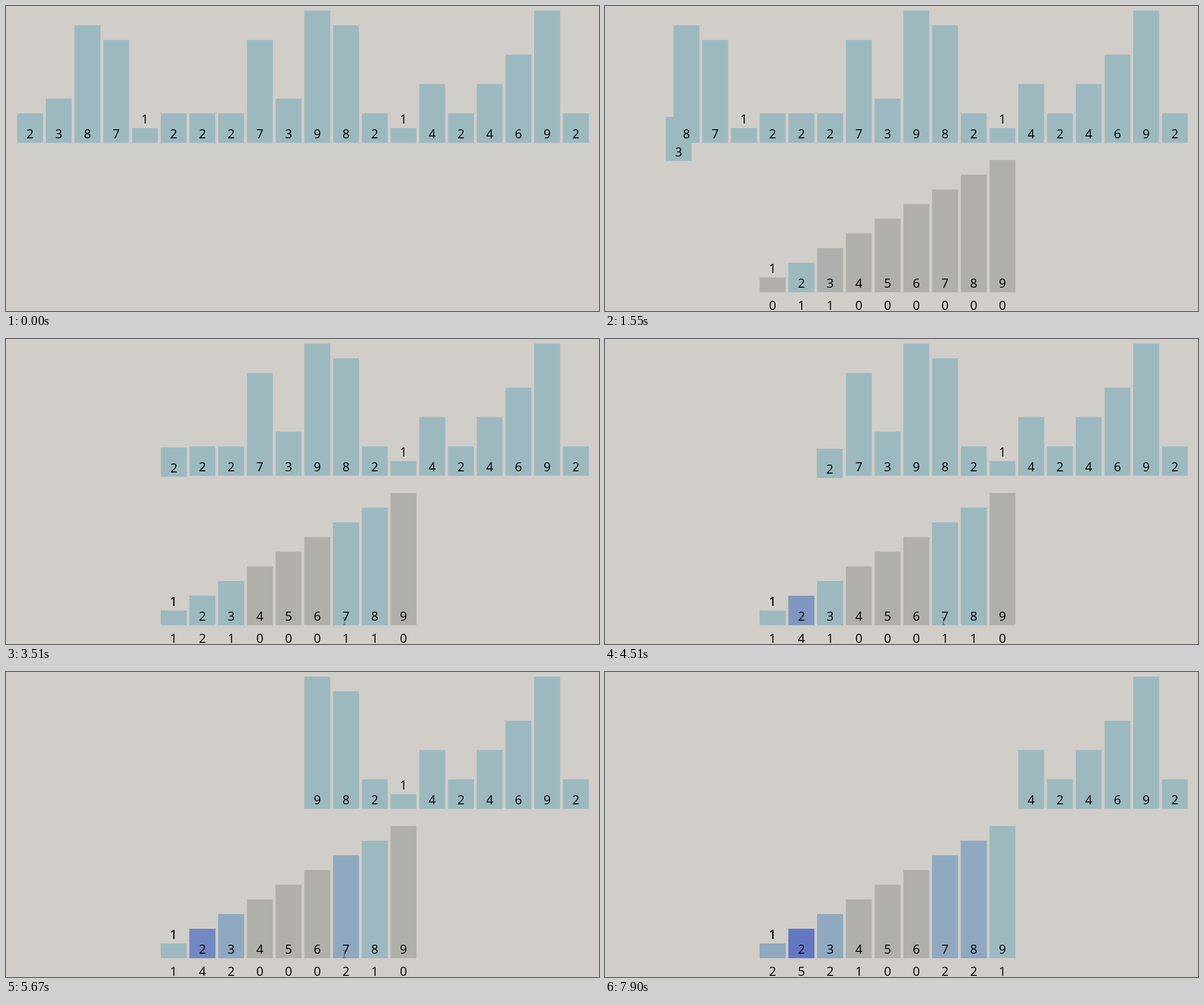
Write an HTML page that moves like this. It is 1043 px wide and 537 px high and loops after 7.99 s.

```html
<!DOCTYPE html>
<html lang="en">
<head>
<meta charset="utf-8">
<title>Counting sort</title>
<style>
  html, body { margin: 0; width: 100%; height: 100%; overflow: hidden; background: #d1cdc8; }
  svg { display: block; width: 100%; height: 100%; }
  text { font: 22px "Open Sans", "Noto Sans", sans-serif; text-anchor: middle; fill: #000; }
</style>
</head>
<body>
<svg id="stage" viewBox="0 0 1043 537"></svg>
<script>
const LOOP = 7990, DURATION = 250;
const LEFT = 19.5, PITCH = 50.53, WIDTH = 45.5, UNIT = 25.85;
const BASE = 240.8, DROP = 263, FIRST_BUCKET = 5;
const GRAY = [176, 175, 170], BLUE = [157, 185, 192], DEEPEN = [-14.5, -16.5, 0.7];

const values = [2, 3, 8, 7, 1, 2, 2, 2, 7, 3, 9, 8, 2, 1, 4, 2, 4, 6, 9, 2];

// [time of the first visible step, ms already eased by then]
const intro = [500, 19];
const moves = [
  [1030, 55], [1480, 8], [2030, 50], [2490, 24], [3030, 50],
  [3500, 30], [3960, 25], [4510, 39], [4970, 25], [5440, 25],
  [5980, 50], [6440, 23], [6980, 50], [7440, 50], [7900, 8]
];
const TICKS = [0, 70, 150, 230, 300];

// [time, x, y]; the pointer is hidden outside these spans
const pointerPath = [
  [3420, 595, 497], [6520, 597, 495], [6670, 640, 484],
  [6740, 760, 482], [6820, 880, 506], [6900, 945, 533], [6980, -50, -50]
];

const stage = document.getElementById("stage");

function add(parent, tag, attrs, content = "") {
  const el = document.createElementNS("http://www.w3.org/2000/svg", tag);
  for (const key in attrs) el.setAttribute(key, attrs[key]);
  el.textContent = content;
  return parent.appendChild(el);
}

const rgb = c => `rgb(${c.map(Math.round).join()})`;
const mix = (a, b, p) => a.map((v, i) => v + (b[i] - v) * p);
const shade = n => n ? BLUE.map((v, i) => v + DEEPEN[i] * (n - 1)) : GRAY;
const ease = u => u < 0.5 ? 4 * u ** 3 : 1 - 4 * (1 - u) ** 3;
const columnX = i => LEFT + PITCH * i;

function addBar(parent, column, base, value, color) {
  const group = add(parent, "g", {});
  const x = columnX(column), height = value * UNIT;
  const rect = add(group, "rect", { x, y: base - height, width: WIDTH, height, fill: rgb(color) });
  const labelY = value === 1 ? base - height - 8 : base - 7.8;
  add(group, "text", { x: x + WIDTH / 2, y: labelY }, value);
  return { group, rect };
}

const bars = values.map((v, i) => addBar(stage, i, BASE, v, BLUE));
const bucketLayer = add(stage, "g", {});
const buckets = Array.from({ length: 9 }, (_, i) => {
  const column = FIRST_BUCKET + i;
  const { rect } = addBar(bucketLayer, column, BASE + DROP, i + 1, GRAY);
  const count = add(bucketLayer, "text", { x: columnX(column) + WIDTH / 2, y: 534.7 }, 0);
  return { rect, count };
});
const pointer = add(stage, "path", {
  d: "M-2.5-6.5H-.5M.5-6.5H2.5M0-6V6M-2.5 6.5H-.5M.5 6.5H2.5",
  stroke: "#4c4f50", fill: "none"
});

// Eased progress, held between the coarse ticks of a move.
function progress([start, lag], t) {
  const tick = TICKS.filter(d => start + d <= t).pop();
  return tick === undefined ? 0 : ease(Math.min(1, (tick + lag) / DURATION));
}

function render(t) {
  bucketLayer.setAttribute("opacity", progress(intro, t));

  const counts = Array(9).fill(0), colors = counts.map(() => GRAY);
  moves.forEach((move, i) => {
    const slot = values[i] - 1;
    const p = progress(move, t);
    const dx = PITCH * (FIRST_BUCKET + slot - i) * p;
    bars[i].group.setAttribute("transform", `translate(${dx} ${DROP * p})`);
    if (t >= move[0]) {
      const n = ++counts[slot];
      colors[slot] = mix(shade(n - 1), shade(n), p);
    }
  });
  buckets.forEach((b, i) => {
    b.rect.setAttribute("fill", rgb(colors[i]));
    b.count.textContent = counts[i];
  });

  const [, x, y] = pointerPath.filter(s => s[0] <= t).pop() || [0, -50, -50];
  pointer.setAttribute("transform", `translate(${x} ${y})`);
}

const began = performance.now();
function loop() {
  render((performance.now() - began) % LOOP);
  requestAnimationFrame(loop);
}
loop();
</script>
</body>
</html>
```
